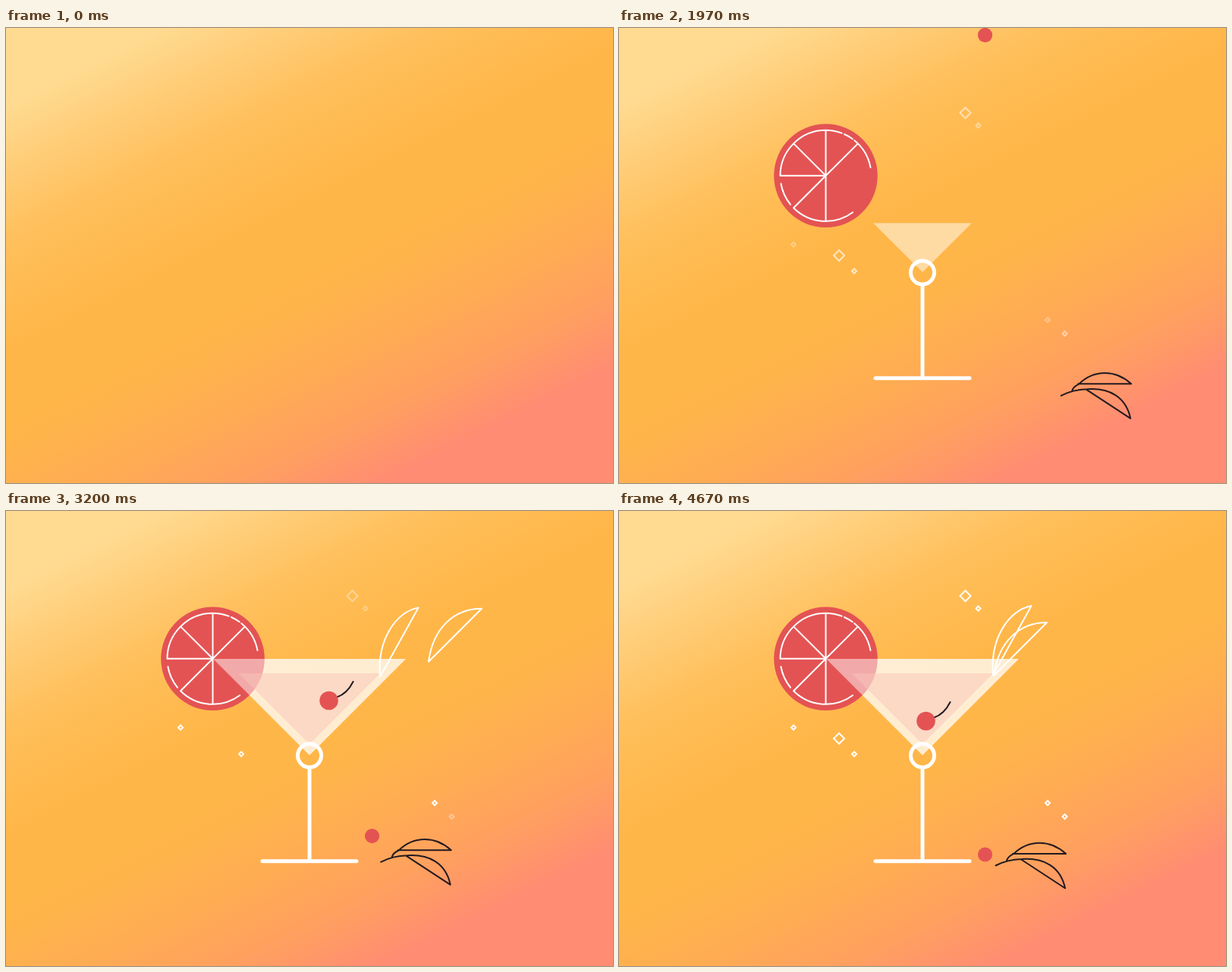
Recreate the animation shown at these times as an HTML page with a canvas. Size 800 by 600 pixels, loop 4.71 s.

```html
<!DOCTYPE html>
<html lang="en">
<head>
<meta charset="utf-8">
<title>Cocktail</title>
<style>
  html, body { margin: 0; width: 100%; height: 100%; overflow: hidden; }
  canvas {
    display: block;
    background: linear-gradient(153.435deg, #ffdb92 10%, #ffcb74 20%, #ffbf5a 29%, #ffb648 43%,
      #ffb648 53%, #ffae51 63%, #ffa15e 74%, #ff8c73 85%);
  }
</style>
</head>
<body>
<canvas id="stage" width="800" height="600"></canvas>
<script>
const ctx = document.getElementById('stage').getContext('2d');
const LOOP = 4710, END = 4670, TURN = 2 * Math.PI, RAD = Math.PI / 180;
const RED = '#e45353', DARK = '#231a20', WHITE = '#fff', FROST = 'rgba(255,255,255,.5)';

// x, y, half size, time of full light, twinkle period
const sparkles = [
  [456.5, 112, 7, 3600, 1400],
  [290, 300, 7, 4650, 3000],
  [473.5, 128.5, 3, 4550, 800],
  [230, 285.5, 3, 2800, 3000],
  [310, 320.5, 3, 4250, 1170],
  [565, 385, 3, 2700, 1000],
  [587.5, 403, 3, 3600, 1350]
];

const twig = new Path2D(`M496.5 467.5Q512 459.5 531 459C560 457 582 469 588 497.5L530 459.5
  M511 461C512 457 515 454.5 520 452.2C540 433 568 433 589 452L519 452`);
const tallLeaf = new Path2D('M493 216L543.5 125C515 131 489 165 493 216Z');
const wideLeaf = new Path2D('M494 217L564 147C528 147 500 172 494 217Z');
const cherryStem = new Path2D('M10.5 -4.5Q24 -9 32 -25');
const peel = new Path2D();
for (const [from, to] of [[180, 290.7], [294, 306], [309, 349.5], [53.5, 135], [140.7, 170]]) {
  peel.moveTo(60 * Math.cos(from * RAD), 60 * Math.sin(from * RAD));
  peel.arc(0, 0, 60, from * RAD, to * RAD);
}
for (const angle of [-90, -45, 90, 135, 180, 225]) {
  peel.moveTo(0, 0);
  peel.lineTo(60 * Math.cos(angle * RAD), 60 * Math.sin(angle * RAD));
}

const progress = (t, start, end) => Math.min(1, Math.max(0, (t - start) / (end - start)));

// Strong ease in and out
function ease(t, start) {
  const p = progress(t, start, start + 719);
  return p < .5 ? 16 * p ** 5 : 1 - 16 * (1 - p) ** 5;
}

// Distance still to travel, equal to 1 half a second before arrival
const away = (t, arrival, power) => Math.max(0, (arrival - t) / 500) ** power;

function disc(x, y, r) {
  ctx.fillStyle = RED;
  ctx.beginPath();
  ctx.arc(x, y, r, 0, TURN);
  ctx.fill();
}

function strokeAt(path, x, y, color) {
  ctx.save();
  ctx.translate(x, y);
  ctx.strokeStyle = color;
  ctx.stroke(path);
  ctx.restore();
}

// Right-angled triangle standing on its tip
function cup(tipY, size, color) {
  ctx.fillStyle = color;
  ctx.beginPath();
  ctx.moveTo(400, tipY);
  ctx.lineTo(400 - size, tipY - size);
  ctx.lineTo(400 + size, tipY - size);
  ctx.fill();
}

function drawSlice(t) {
  const turn = ease(t, 811.5);
  ctx.save();
  ctx.translate(272.5, 194.8);
  disc(0, 0, 68.3 * ease(t, 823));
  ctx.rotate((turn - 1) * Math.PI);
  ctx.globalAlpha = turn;
  ctx.strokeStyle = WHITE;
  ctx.stroke(peel);
  ctx.restore();
}

function drawStand(t) {
  const grow = ease(t, 794), sweep = ease(t, 1150) * Math.PI;
  if (!grow) return;
  const half = Math.max(0, 64.5 * grow - 2.5);
  ctx.save();
  ctx.strokeStyle = WHITE;
  ctx.lineWidth = 5;
  ctx.beginPath();
  ctx.moveTo(400 - half, 461.8);
  ctx.lineTo(400 + half, 461.8);
  ctx.moveTo(400, 461);
  ctx.lineTo(400, 461 - 121 * grow);
  if (sweep) {
    ctx.moveTo(400 + 15.5 * Math.sin(sweep), 322.5 + 15.5 * Math.cos(sweep));
    ctx.arc(400, 322.5, 15.5, Math.PI / 2 - sweep, Math.PI / 2 + sweep);
  }
  ctx.stroke();
  ctx.restore();
}

function drawSparkles(t) {
  ctx.save();
  ctx.strokeStyle = WHITE;
  ctx.lineJoin = 'miter';
  for (const [x, y, r, settled, period] of sparkles) {
    const left = Math.max(0, settled - t);
    ctx.globalAlpha = progress(t, 1600, 2100) * (.5 + .5 * Math.cos(TURN * left / period));
    ctx.beginPath();
    ctx.moveTo(x, y - r);
    ctx.lineTo(x + r, y);
    ctx.lineTo(x, y + r);
    ctx.lineTo(x - r, y);
    ctx.closePath();
    ctx.stroke();
  }
  ctx.restore();
}

function drawLeaves(t) {
  const left = Math.max(0, END - t);
  const swayX = 4 * Math.sin(TURN * left / 2450);
  const swayY = -1.7 - 3 * Math.cos(TURN * (left - 1440) / 2200);
  strokeAt(twig, 84 * away(t, 2470, 1.6) + swayX, 16.5 * away(t, 2470, 4.7) + swayY, DARK);

  const tilt = 3 * Math.sin(TURN * left / 4160);
  const tall = away(t, 3000, 1.8), wide = away(t, 3400, 1.2);
  strokeAt(tallLeaf, 176 * tall, tilt - 91 * tall, WHITE);
  strokeAt(wideLeaf, 190 * wide, -tilt - 48 * wide, WHITE);
}

function drawCherries(t) {
  const sink = .5 - .5 * Math.cos(Math.PI * progress(t, 2400, 3900));
  const x = 404.5 + 14 * (1 - sink) + 15 * Math.sin(Math.PI * sink);
  const y = 277 - 60.5 * (1 - sink) - 280 * away(t, 2500, 2);
  strokeAt(cherryStem, x, y, DARK);
  disc(x, y, 12.3);
  // The berry falls fast, then settles slowly
  disc(482.5, 453 - 3.4 * away(t, END, 1.83) - 255 * away(t, 2830, .684), 9.6);
}

function draw() {
  const t = performance.now() % LOOP;
  ctx.clearRect(0, 0, 800, 600);
  ctx.lineWidth = 2;
  ctx.lineCap = ctx.lineJoin = 'round';
  cup(322, 127 * ease(t, 1610), FROST);
  drawSlice(t);
  cup(322, 127 * ease(t, 2059), FROST);
  cup(307.5, 93.5 * ease(t, 2062), 'rgba(249,197,186,.5)');
  drawStand(t);
  drawSparkles(t);
  drawLeaves(t);
  drawCherries(t);
  requestAnimationFrame(draw);
}
draw();
</script>
</body>
</html>
```
